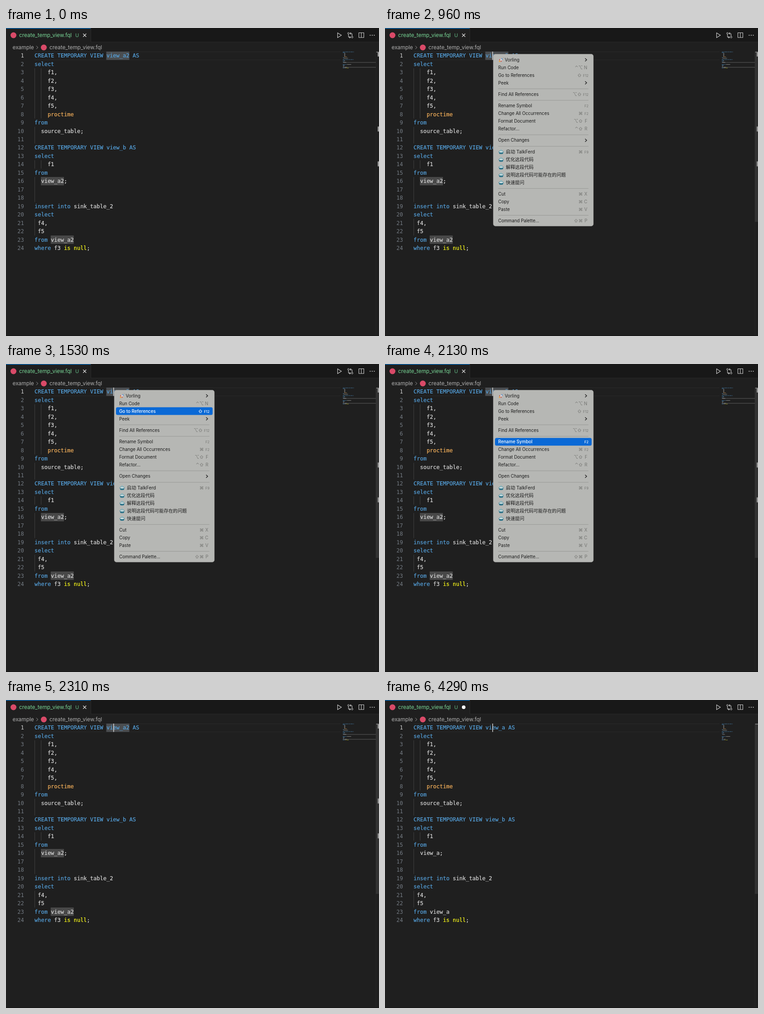
Recreate the animation shown at these times as an HTML page. Size 824x680 px, loop 4440 ms.

```html
<!DOCTYPE html>
<html lang="en">
<head>
<meta charset="utf-8">
<title>Rename symbol</title>
<style>
  html, body { margin: 0; width: 100%; height: 100%; overflow: hidden; background: #1f1f1f; }
  svg { display: block; width: 100%; height: 100%; }
  text { white-space: pre; }
  .ui { font: 11.85px Inter, "Open Sans", sans-serif; }
  .code { font: 12px "DejaVu Sans Mono", monospace; stroke-width: .2; }
  .menu { font: 9.8px Inter, "Noto Sans CJK SC", "Noto Sans CJK", "DejaVu Sans", sans-serif; fill: #1c1c1c; }
  .cjk { font-size: 10.2px; }
  .key { fill: #747572; }
  .fn { font-size: 7.4px; }
  .arrow { fill: none; stroke: #222; stroke-width: 1.4; }
  .on, .on .key { fill: #fff; font-weight: 500; }
  .on .arrow { stroke: #fff; }
</style>
</head>
<body>
<svg id="stage" viewBox="0 0 824 680"></svg>
<script>
const LOOP = 4440, STEP = 30;
const LEFT = 63, TOP = 52, CHAR = 7.224, LINE = 18.46;
const BLUE = '#56a4e0', PLAIN = '#dadada';

const rect = (x, y, w, h, fill, more = '') =>
  `<rect x="${x}" y="${y}" width="${w}" height="${h}" fill="${fill}" ${more}/>`;
const path = (d, fill, more = '') => `<path d="${d}" fill="${fill}" ${more}/>`;
const line = (d, stroke, width = 1, more = '') => path(d, 'none', `stroke="${stroke}" stroke-width="${width}" ${more}`);
const circle = (x, y, r, fill, more = '') => `<circle cx="${x}" cy="${y}" r="${r}" fill="${fill}" ${more}/>`;
const text = (x, y, str, cls, fill, more = '') =>
  `<text x="${x}" y="${y}" class="${cls}" ${fill ? `fill="${fill}"` : ''} ${more}>${str}</text>`;
const group = (id, body, more = '') => `<g id="${id}" ${more}>${body}</g>`;

// ---- editor ----
const source = view => `CREATE TEMPORARY VIEW ${view} AS
select
    f1,
    f2,
    f3,
    f4,
    f5,
    proctime
from
  source_table;

CREATE TEMPORARY VIEW view_b AS
select
    f1
from
  ${view};


insert into sink_table_2
select
 f4,
 f5
from ${view}
where f3 is null;`.split('\n');

function tokenColor(word, row) {
  if (row.startsWith('CREATE') || /^(select|from|insert|into|where)$/.test(word)) return BLUE;
  if (word === 'proctime') return '#f9b35c';
  return /^(is|null)$/.test(word) ? '#ffff1a' : PLAIN;
}

function code(view, marked) {
  let marks = '', words = '', map = '';
  source(view).forEach((row, i) => {
    const y = TOP + i * LINE, mapY = TOP + 0.4 + i * 1.54;
    for (const { 0: word, index } of row.matchAll(/\w+|[^\w\s]+/g)) {
      const x = LEFT + index * CHAR, color = tokenColor(word, row);
      if (marked && word === view) {
        marks += rect(x - 0.4, y, word.length * CHAR + 0.4, LINE, i ? '#484848' : '#4a4d50');
        if (i) map += rect(744, mapY, 73, 1, '#5c5c5c');
      }
      words += text(x, y + 13.4, word, 'code', color, `stroke="${color}"`);
      map += rect(744 + index * 0.77, mapY, word.length * 0.77, 0.9, color, 'opacity=".6"');
    }
  });
  const ruler = marked
    ? [[54, 9], [217.5, 11], [294.5, 11]].map(([y, h]) => rect(821, y, 3, h, '#9a9a9a')).join('') : '';
  return marks + words + map + ruler;
}

const guides = [[0, 3, 8], [2, 3, 8], [0, 10, 11], [0, 14, 14], [2, 14, 14], [0, 16, 18], [0, 21, 22]]
  .map(([col, from, to]) => rect(Math.round(LEFT + col * CHAR), TOP + (from - 1) * LINE, 1, (to - from + 1) * LINE, '#404040'))
  .join('');

const numbers = source('').map((_, i) =>
  text(39.8, TOP + 13.4 + i * LINE, i + 1, 'code', i ? '#737a82' : '#d0d0d0', `text-anchor="end" ${i ? '' : 'font-weight="bold"'}`)).join('');

const frame =
  rect(0, 0, 824, 680, '#1f1f1f') + rect(187, 0, 637, 31, '#181818') +
  rect(187, 30.5, 637, 1, '#2b2b2b') + rect(187, 0, 1, 31, '#2b2b2b') + rect(0, 0, 187, 1.2, '#0078d4') +
  circle(16.5, 16, 6.5, '#d94a68') + text(29, 20.3, 'create_temp_view.fql', 'ui', '#78d696') +
  text(153, 20, 'U', 'ui', '#62b884', 'style="font-size:11px"') +
  text(14.5, 47, 'example', 'ui', '#b0b0b0') + line('M67 39.5l3.5 3.5-3.5 3.5', '#a0a0a0') +
  circle(83.5, 43, 6.5, '#d94a68') + text(96, 47, 'create_temp_view.fql', 'ui', '#b0b0b0') +
  line('M732.5 10.8v10.4l8.5-5.2z', '#d0d0d0', 1.1) +
  line('M756.5 14v4.5q0 2 2 2h2.5m-2-2 2 2-2 2M764.5 18v-4q0-2-2-2H760m2-2-2 2 2 2', '#d0d0d0', 1.1) +
  circle(756.5, 11.8, 1.8, 'none', 'stroke="#d0d0d0"') + circle(764.7, 20.2, 1.8, 'none', 'stroke="#d0d0d0"') +
  line('M779.5 10.5h11v10.5h-11zM785 10.5v10.5', '#d0d0d0', 1.1) +
  [804.5, 809, 813.5].map(x => circle(x, 16, 1.1, '#d0d0d0')).join('') +
  rect(LEFT, 52, 676, 1, '#2a2a2a') + rect(LEFT, 69.8, 676, 1, '#2a2a2a') +
  rect(817, 52, 1, 626, '#272727') + rect(0, 678, 824, 2, '#191919') + guides + numbers;

// ---- menu icons, each about 11px around its centre ----
const blueTile = rect(-5.5, -5.5, 11, 11, '#3f8fc4', 'rx="2"');
const icons = {
  rocket: path('M5-5Q0-5-3 0L0 3Q5 0 5-5Z', '#e4e5e8', 'stroke="#777" stroke-width=".6"') +
    path('M-1-2-5 0l2 1zM2 1 0 5-1 3z', '#d53b35') + path('M-5 5l1-4 3 3z', '#f29b2c') + circle(2, -2, 1.2, '#2d6fb0'),
  bowl: path('M-5 0H5Q5 5 2 5H-2Q-5 5-5 0Z', '#2b7187') + `<ellipse rx="5.2" ry="2" fill="#d9e8e9" stroke="#2b7187"/>` +
    path('M-3-1Q-3-5 0-5T3-1Z', '#8fb6bd'),
  bug: line('M-3 0l-2 1M0 3l-1 2M0-2l1-3M3 0l2-1', '#333') +
    `<ellipse rx="5.5" ry="2.8" transform="rotate(40)" fill="#71852a"/>` + line('M-2 1l3-3M0 3l3-3', '#e0c338', 1.2),
  bubble: path('M-5-1Q-5-4 0-4T5-1 0 3L-3 5-2.5 2.5Q-5 2-5-1Z', '#f4f4f4') +
    [-2, 0, 2].map(x => circle(x, -0.5, 0.6, '#888')).join(''),
  wrench: line('M-2-2 5 5', '#777d82', 2) + line('M-5-3-3-1-1-3-3-5', '#777d82', 1.6),
  tube: line('M4-4-4 4', '#e8f0ef', 3.4) + line('M2-2-4 4', '#48a66d', 3) + line('M2-5l3 3', '#8b9496'),
  lens: line('M1 1l4 4', '#333', 2) + circle(-1.5, -1.5, 3.3, '#c9dde8', 'stroke="#444" stroke-width="1.2"'),
  question: line('M-2-3Q-1-5 1-4T1-1L0 0V2', '#d9262c', 2) + circle(0, 4.3, 1.1, '#d9262c'),
  plus: line('M-4.5 0h9M0-4.5v9', '#333', 1.8),
  shuffle: blueTile + line('M-4-2h2l4 4h2M-4 2h2l4-4h2M3-4l1.5 2L3 0M3 0l1.5 2L3 4', '#fff'),
  key: line('M1-1-4.5 4.5m1-1 1.5 1.5M-2 2l1.5 1.5', '#d69a23', 1.8) + circle(2.4, -2.4, 2.3, 'none', 'stroke="#d69a23" stroke-width="1.8"'),
  check: line('M-4.5 0-1.5 4 4.5-4.5', '#2c2c2c', 2),
  refresh: blueTile + line('M-3 1a3 3 0 0 1 5-3m1-2v3H0M3-1a3 3 0 0 1-5 3m-1 2V1H0', '#fff'),
  globe: circle(0, 0, 5.4, '#2868a8') + path('M-4-3Q-1-6 1-4L0-1-2 0 0 2-1 5-4 1ZM2-2l3 1-1 4-2-1z', '#72a83c'),
  mesh: circle(0, 0, 5, '#a6d3ea', 'stroke="#3e94c4"') +
    line('M-5 0H5M0-5V5M-4-3H4M-4 3H4M0-5Q-5 0 0 5M0-5Q5 0 0 5', '#3e94c4', 0.7)
};
const icon = (name, x, y) => `<g transform="translate(${x} ${y})">${icons[name]}</g>`;

// ---- menus: "icon:label|modifiers|key", ">" opens a submenu, "-" is a separator ----
const mainRows = `rocket:Vorling|>
Run Code|⌃⌥|N
Go to References|⇧|F12
Peek|>
-
Find All References|⌥⇧|F12
-
Rename Symbol||F2
Change All Occurrences|⌘|F2
Format Document|⌥⇧|F
Refactor...|⌃⇧|R
-
Open Changes|>
-
bowl:启动 TalkFerd|⌘|F9
bowl:优化这段代码
bowl:解释这段代码
bowl:说明这段代码可能存在的问题
bowl:快速提问
-
Cut|⌘|X
Copy|⌘|C
Paste|⌘|V
-
Command Palette...|⇧⌘|P`.split('\n');

// "label|icon x|icon x"
const subRows = `Check the following code for bugs and provide repair suggestions|bug 782
Explain the following code in detail|bubble 637
Refactor this code and tell me what did you change|wrench 715
Add tests for the following code|tube 625
Select predefined prompt|lens 596
Custom prompt|question 550
Add predefined prompt|plus 585
-
Bind your own API key|shuffle 577|key 592
Validate API key|check 551|key 566
Refresh API key|refresh 549|key 564
-
Set language|globe 538
Set up a custom proxy server|mesh 613`.split('\n');

function layout(rows, x, width, item) {
  let y = 70.2 - 16.95;
  return rows.map(row => {
    if (row === '-') {
      y += 8.4;
      return rect(x, y + 4.3, width, 1, '#989996');
    }
    y += 16.95;
    return `<g class="item" data-y="${y}">${item(row.split('|'), y)}</g>`;
  }).join('');
}

function mainItem([label, mods, key], y) {
  const [, name, title] = label.match(/^(?:(\w+):)?(.*)$/);
  const x = name === 'rocket' ? 264.5 : name ? 267 : 250;
  const out = (name ? icon(name, 256.5, y) : '') + text(x, y + 3.5, title, name === 'bowl' ? 'cjk' : '');
  if (mods === '>') return out + `<path class="arrow" d="M442 ${y - 3.2}l3.6 3.2-3.6 3.2"/>`;
  if (!key) return out;
  const isFn = key.length > 1, isWide = key.length > 2;
  return out + text(isWide ? 434.5 : 437, y + 3.5, mods, 'key', '', 'text-anchor="end"') +
    text(isFn ? 449.5 : 447, y + 3.5, key, isFn ? 'key fn' : 'key', '', 'text-anchor="end"');
}

function subItem([label, ...marks], y) {
  return text(467.5, y + 3.5, label, '') + marks.map(mark => {
    const [name, x] = mark.split(' ');
    return icon(name, x, y);
  }).join('');
}

const panel = (x, w, h) => rect(x, 57.5, w, h, '#b6b7b4', 'rx="5" stroke="#777" stroke-width=".5"');

const renameBox =
  rect(222.5, 71.5, 174.5, 42.5, '#202020', 'rx="3" stroke="#333"') +
  rect(227, 75.5, 155, 21.5, '#313131', 'rx="2" stroke="#0078d4"') +
  rect(230.5, 78.5, 7 * CHAR, 15, '#264f78', 'id="selection"') +
  text(230.5, 90.2, '', 'code', PLAIN, `id="input" stroke="${PLAIN}"`) +
  rect(0, 79, 1, 14, '#e0e0e0', 'id="inputCaret"') +
  text(226.5, 108.5, 'Enter to Rename, ⇧Enter to Preview', 'menu', '', 'style="fill:#c4c4c4"');

const stage = document.getElementById('stage');
stage.innerHTML = frame +
  group('before', code('view_a2', true)) +
  group('after', code('view_a', false)) +
  rect(818, 52.5, 6, 1.5, '#8a8a8a') +
  rect(817, 52, 7, 376, '#797979', 'id="slider"') +
  line('M170.3 12.5l7 7m0-7-7 7', '#e0e0e0', 1.2, 'id="close"') +
  circle(173.8, 16, 4, '#fff', 'id="dirty"') +
  rect(237, 52, 1.5, 18.5, '#d8d8d8', 'id="caret"') +
  group('mainMenu', panel(239, 221.5, 380) +
    rect(243, 0, 213.5, 17, '#0a69d6', 'id="highlight" rx="3.5"') +
    layout(mainRows, 250, 199.5, mainItem), 'class="menu"') +
  group('subMenu', panel(457, 345, 228) + layout(subRows, 467.5, 323, subItem), 'class="menu"') +
  group('rename', renameBox);

// ---- timeline ----
const el = Object.fromEntries([...stage.querySelectorAll('[id]')].map(node => [node.id, node]));
const items = [...el.mainMenu.querySelectorAll('.item')];
const hover = [[0, -1], [1020, 0], [1410, 1], [1500, 2], [1560, 3], [1680, 4], [1860, 5], [2040, -1], [2100, 5]];
const during = (t, from, to) => t >= from && t < to;
const ramp = (t, from, to) => Math.min(1, Math.max(0, (t - from) / (to - from)));
const show = (node, opacity) => {
  node.style.display = opacity ? '' : 'none';
  node.style.opacity = +opacity;
};

function draw(t) {
  const renamed = t >= 3420;
  show(el.before, !renamed);
  show(el.after, renamed);
  show(el.close, !renamed);
  show(el.dirty, renamed);
  show(el.slider, 0.2 * ramp(t, 570, 660));

  const blink = during(t, 3780, 3810) ? 0.5 : during(t, 3810, 4290) ? 0 : 1;
  show(el.caret, during(t, 600, 630) ? 0.5 : during(t, 630, 2340) || t >= 3360 ? blink : 0);

  const active = hover.findLast(([start]) => t >= start)[1];
  show(el.mainMenu, t < 960 ? 0 : 1 - ramp(t, 2160, 2270));
  show(el.highlight, active >= 0);
  items.forEach((item, i) => item.classList.toggle('on', i === active));
  if (active >= 0) el.highlight.setAttribute('y', items[active].dataset.y - 8.5);
  show(el.subMenu, t < 1140 ? 0 : 1 - ramp(t, 1380, 1470));

  const value = t < 3150 ? 'view_a2' : 'view_a';
  show(el.rename, during(t, 2340, 3360));
  show(el.selection, t < 2670);
  show(el.inputCaret, t >= 2670);
  el.input.textContent = value;
  el.inputCaret.setAttribute('x', 230.4 + value.length * CHAR);
}

function tick() {
  draw(Math.floor(performance.now() % LOOP / STEP) * STEP);
  requestAnimationFrame(tick);
}
tick();
</script>
</body>
</html>
```
